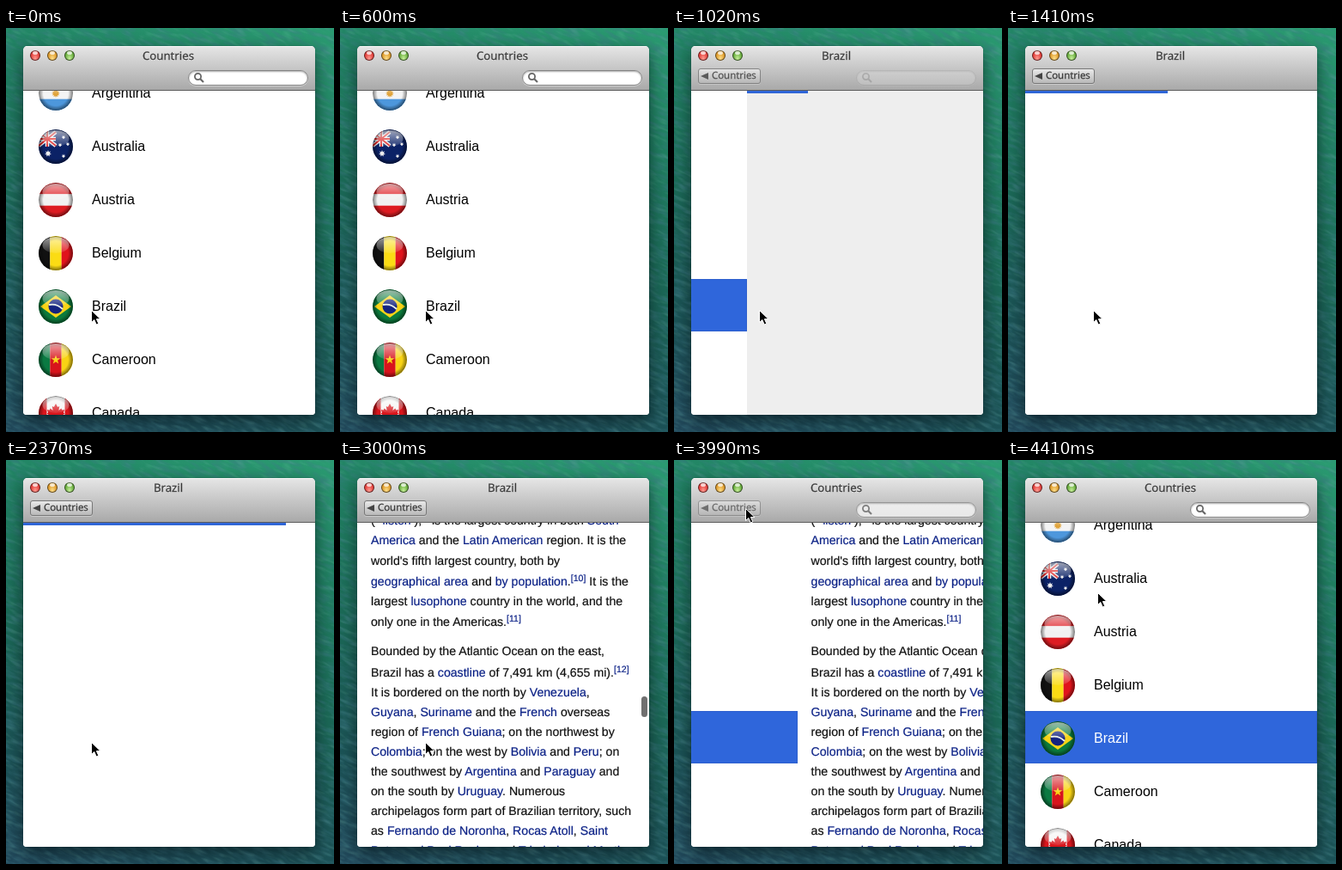
An HTML page for the animation above (4.44 s loop, 382 by 470 pixels).

```html
<!DOCTYPE html>
<html lang="en">
<head>
<meta charset="utf-8">
<title>Countries</title>
<style>
  html, body { margin: 0; width: 100%; height: 100%; overflow: hidden; }
  #stage {
    position: relative; width: 382px; height: 470px; overflow: hidden;
    background: linear-gradient(196deg, #2b9c72 0%, #218263 22%, #1b6a57 50%, #1b5456 76%, #21475a 100%);
  }
  #stage * { box-sizing: border-box; }
  #stage > *, #bar > *, .page, .row > *, .line, #thumb, #progress { position: absolute; }
  #stage *, #cursor * { animation: 4440ms linear infinite; }

  #sea { left: 0; top: 0; }
  #win {
    left: 20px; top: 21px; width: 340px; height: 429px; border-radius: 5px 5px 4px 4px;
    background: #fff; box-shadow: 0 7px 19px rgba(0, 10, 15, .6), 0 0 1px rgba(0, 0, 0, .5);
  }
  #clip { position: absolute; inset: 0; overflow: hidden; border-radius: inherit; }

  #bar {
    position: absolute; left: 0; top: 0; width: 340px; height: 52px;
    background: linear-gradient(#e6e6e6, #d0d0d0 35%, #a9a9a9);
    border-bottom: 1px solid #5c5c5c; box-shadow: inset 0 1px #f6f6f6;
    font-family: "Noto Sans", "Open Sans", sans-serif; color: #3a3a3a;
    -webkit-text-stroke: .25px; text-rendering: geometricPrecision;
  }
  .light { top: 5px; width: 12px; height: 12px; border-radius: 50%; border: 1px solid #0008; }
  .light::after {
    content: ""; position: absolute; left: 2px; top: 0; width: 6px; height: 4px;
    border-radius: 50%; background: #fffb;
  }
  .title { left: -1px; top: 2px; width: 340px; text-align: center; font-size: 13.2px; line-height: 18px; text-shadow: 0 1px #fff8; }
  #bar #tList { animation-name: listTitle; animation-timing-function: step-end; }
  #bar #tItem { animation-name: itemTitle; animation-timing-function: step-end; }
  #bar #back {
    left: 8px; top: 26px; width: 73px; height: 18px; border: 1px solid #777; border-radius: 3px;
    background: linear-gradient(#e9e9e9, #b9b9b9); box-shadow: 0 1px #fff5;
    font-size: 11.4px; line-height: 16px; padding-left: 15px; animation-name: backFade;
  }
  #back::before {
    content: ""; position: absolute; left: 2px; top: 4px;
    border: solid transparent; border-width: 4.5px 9px 4.5px 0; border-right-color: #444;
  }
  #bar #search {
    left: 192px; top: 28px; width: 140px; height: 18px; border: 1px solid #858585; border-radius: 9px;
    background: #fff; box-shadow: inset 0 1px 2px #0005, 0 1px #fff6; animation-name: searchFade;
  }
  #search svg { position: absolute; left: 5px; top: 1px; }

  #view { position: absolute; left: 0; top: 52px; width: 340px; height: 377px; overflow: hidden; }
  #view #track { position: absolute; left: 0; top: 0; width: 680px; height: 377px; animation-name: push; }
  .page { top: 0; width: 340px; height: 377px; overflow: hidden; }
  #list { left: 0; background: #fff; font: 16px "Liberation Sans", Arial, sans-serif; color: #000; }
  .row { position: absolute; left: 0; width: 340px; height: 61px; }
  .row svg { left: 18px; top: 12px; }
  .row span { left: 80px; top: 20px; line-height: 24px; }
  #list .picked { animation-name: pick; animation-timing-function: step-end; }
  #track #item { left: 340px; background: #eee; animation-name: paper; animation-timing-function: step-end; }
  #item #progress { left: 0; top: 0; height: 3px; background: #2f66d8; animation-name: load, loadFade; }
  #item #loaded { animation-name: show; animation-timing-function: step-end; }
  #loaded #article { position: absolute; left: 0; width: 340px; animation-name: scroll; }
  #article {
    font: 14.15px "Liberation Sans", Arial, sans-serif; color: #111;
    -webkit-text-stroke: .2px; text-rendering: geometricPrecision;
  }
  .line { left: 16px; height: 24px; line-height: 24px; white-space: pre; }
  .line b { font-weight: normal; color: #0b2186; }
  .line sup { font-size: 10.6px; line-height: 0; vertical-align: baseline; position: relative; top: -5px; color: #0b2186; }
  #article .head { font-size: 24px; }
  #loaded #thumb { left: 331px; width: 7px; height: 24px; border-radius: 4px; background: #707070; animation-name: thumb; }

  #stage #cursor { left: 0; top: 0; animation-name: point; }
  #cursor svg { position: absolute; overflow: visible; animation-timing-function: step-end; }
  #cursor #arrow { left: 0; top: 0; animation-name: arrow; }
  #cursor #beam { left: -2px; top: -9px; animation-name: beam; }

  @keyframes push {
    0%, 17.34% { left: 0; animation-timing-function: ease-in-out; }
    25.45%, 86.49% { left: -340px; animation-timing-function: ease-in-out; }
    94.59%, 100% { left: 0; }
  }
  @keyframes backFade {
    0%, 17.34% { opacity: 0; animation-timing-function: ease-in-out; }
    25.45%, 86.49% { opacity: 1; animation-timing-function: ease-in-out; }
    94.59%, 100% { opacity: 0; }
  }
  @keyframes searchFade {
    0%, 17.34% { opacity: 1; animation-timing-function: ease-in-out; }
    25.45%, 86.49% { opacity: 0; animation-timing-function: ease; }
    94.59%, 100% { opacity: 1; }
  }
  @keyframes listTitle { 0%, 86.49%, 100% { opacity: 1; } 17.34% { opacity: 0; } }
  @keyframes itemTitle { 0%, 86.49%, 100% { opacity: 0; } 17.34% { opacity: 1; } }
  @keyframes pick {
    0% { background: #fff; color: #000; box-shadow: none; }
    16.22%, 100% { background: #2f66db; color: #fff; box-shadow: inset 0 0 0 1px #2d5fcd; }
  }
  @keyframes paper { 0% { background: #eee; } 25.68%, 100% { background: #fff; } }
  @keyframes load {
    0%, 19.6% { width: 34px; }
    31.76% { width: 166px; }
    53.38% { width: 306px; }
    60.8%, 100% { width: 340px; }
  }
  @keyframes loadFade {
    0%, 17.34% { opacity: .3; }
    19.6% { opacity: .52; }
    22.5%, 60.8% { opacity: 1; }
    62.2%, 100% { opacity: 0; }
  }
  @keyframes show { 0% { visibility: hidden; } 61.49%, 100% { visibility: visible; } }
  @keyframes scroll {
    0%, 62.16% { top: 140px; animation-timing-function: ease-out; }
    67.57%, 100% { top: 0; }
  }
  @keyframes thumb {
    0%, 62.16% { top: 3px; animation-timing-function: ease-out; }
    67.57%, 100% { top: 202px; }
  }
  @keyframes point {
    0%, 76.35% { left: 99px; top: 328px; animation-timing-function: ease-in-out; }
    83.1%, 94.59% { left: 83px; top: 56px; animation-timing-function: ease-in-out; }
    99.1%, 100% { left: 104px; top: 154px; }
  }
  @keyframes arrow { 0%, 85.8%, 100% { visibility: visible; } 76.35% { visibility: hidden; } }
  @keyframes beam { 0%, 85.8%, 100% { visibility: hidden; } 76.35% { visibility: visible; } }
</style>
</head>
<body>
<div id="stage">
  <svg id="sea" width="382" height="470">
    <defs>
      <filter id="dark" x="0" y="0" width="100%" height="100%">
        <feTurbulence type="fractalNoise" baseFrequency=".05 .2" numOctaves="3" seed="4"/>
        <feColorMatrix values="0 0 0 0 .05  0 0 0 0 .2  0 0 0 0 .25  2.4 0 0 0 -1"/>
      </filter>
      <filter id="pale" x="0" y="0" width="100%" height="100%">
        <feTurbulence type="fractalNoise" baseFrequency=".06 .24" numOctaves="2" seed="9"/>
        <feColorMatrix values="0 0 0 0 .25  0 0 0 0 .62  0 0 0 0 .5  0 2.4 0 0 -1.2"/>
      </filter>
    </defs>
    <g transform="rotate(24 191 235)">
      <rect x="-160" y="-120" width="700" height="710" filter="url(#dark)" opacity=".5"/>
      <rect x="-160" y="-120" width="700" height="710" filter="url(#pale)" opacity=".22"/>
    </g>
  </svg>

  <div id="win"><div id="clip">
    <div id="view"><div id="track">
      <div id="list" class="page"></div>
      <div id="item" class="page">
        <div id="loaded"><div id="article"></div><div id="thumb"></div></div>
        <div id="progress"></div>
      </div>
    </div></div>
    <div id="bar">
      <i class="light" style="left:8px;background:radial-gradient(at 50% 90%,#ff9c92,#e2403c 70%)"></i>
      <i class="light" style="left:28px;background:radial-gradient(at 50% 90%,#ffe08a,#dd9a2c 70%)"></i>
      <i class="light" style="left:48px;background:radial-gradient(at 50% 90%,#c8f09a,#69ad3f 70%)"></i>
      <div id="tList" class="title">Countries</div>
      <div id="tItem" class="title">Brazil</div>
      <div id="back">Countries</div>
      <div id="search"><svg width="14" height="14" fill="none" stroke="#666" stroke-width="1.8">
        <circle cx="5.5" cy="5.5" r="3.6"/><path d="M8 8l4 4" stroke-width="2.2"/></svg></div>
    </div>
  </div></div>

  <div id="cursor">
    <svg id="arrow" width="13" height="19"><path d="M.5 .5V14.6L3.8 11.5L6.2 17L8.8 15.9L6.4 10.6H11Z" fill="#000" stroke="#fff"/></svg>
    <svg id="beam" width="7" height="17" fill="none">
      <path d="M.5 1Q3.5 1 3.5 3.5Q3.5 1 6.5 1M3.5 3V14M.5 16Q3.5 16 3.5 13.5Q3.5 16 6.5 16M2 10H5" stroke="#000" stroke-width="1.2"/>
    </svg>
  </div>
</div>

<script>
const $ = id => document.getElementById(id);
const rect = (x, y, w, h, fill) => `<rect x="${x}" y="${y}" width="${w}" height="${h}" fill="${fill}"/>`;
const across = colors => colors.map((c, i) => rect(0, i * 40 / 3, 40, 13.4, c)).join('');
const down = colors => colors.map((c, i) => rect(i * 40 / 3, 0, 13.4, 40, c)).join('');

function star(cx, cy, r, fill, points = 5, inner = .4) {
  const pts = [];
  for (let i = 0; i < points * 2; i++) {
    const a = Math.PI * (i / points - .5), d = i % 2 ? r * inner : r;
    pts.push((cx + d * Math.cos(a)).toFixed(1) + ',' + (cy + d * Math.sin(a)).toFixed(1));
  }
  return `<polygon points="${pts.join(' ')}" fill="${fill}"/>`;
}

const jack = '<path d="M0 3L20 19M20 3L0 19M10 2V20M0 11H20" stroke="#eee" stroke-width="4.5"/>' +
  '<path d="M0 3L20 19M20 3L0 19M10 2V20M0 11H20" stroke="#d22" stroke-width="1.8"/>';
const leaf = '<path d="M20 9l2.2 4 2-.9-.8 5 3-2.6.8 1.9 3-.4-1.3 3.4 1.5 1.1-5.4 4.2.5 2-5-.6v4h-1v-4l-5 .6.5-2-5.4-4.2 1.5-1.1-1.3-3.4 3 .4.8-1.9 3 2.6-.8-5 2 .9z" fill="#d8151c"/>';

const countries = {
  Argentina: across(['#5ba6e0', '#f4f4f4', '#4d97dc']) + star(20, 20, 5, '#e0a33a', 12, .6),
  Australia: rect(0, 0, 40, 40, '#0b2266') + jack + star(11, 28, 4, '#eee', 7, .5) +
    [[29, 9], [34, 17], [25, 18], [29, 31]].map(([x, y]) => star(x, y, 2.4, '#eee', 7, .5)).join(''),
  Austria: across(['#dd1c22', '#f1f1f1', '#dd1c22']),
  Belgium: down(['#111', '#fbdc14', '#e0141c']),
  Brazil: rect(0, 0, 40, 40, '#0b7a3c') + '<path d="M2 20L20 7L38 20L20 33Z" fill="#f7d417"/>' +
    '<circle cx="20" cy="20" r="8.5" fill="#14237f"/><path d="M12 18Q21 16 28 23" stroke="#e8eee8" stroke-width="1.8" fill="none"/>',
  Cameroon: down(['#0a7a42', '#d8141c', '#f8d314']) + star(20, 20, 5.5, '#f8d314'),
  Canada: rect(0, 0, 40, 40, '#f4f4f4') + rect(0, 0, 9.5, 40, '#d8151c') + rect(30.5, 0, 9.5, 40, '#d8151c') + leaf
};

const gloss = `<defs>
  <clipPath id="disc"><circle cx="20" cy="20" r="20"/></clipPath>
  <radialGradient id="rim"><stop offset=".72" stop-opacity="0"/><stop offset="1" stop-opacity=".5"/></radialGradient>
  <linearGradient id="shine" x2="0" y2="1"><stop stop-color="#fff" stop-opacity=".6"/><stop offset="1" stop-color="#fff" stop-opacity=".1"/></linearGradient>
  </defs>`;
const badge = (art, defs) => `<svg width="40" height="40">${defs}<g clip-path="url(#disc)">${art}
  <circle cx="20" cy="20" r="20" fill="url(#rim)"/><ellipse cx="20" cy="10.5" rx="15.5" ry="9.5" fill="url(#shine)"/></g></svg>`;

$('list').innerHTML = Object.entries(countries).map(([name, art], i) =>
  `<div class="row${name === 'Brazil' ? ' picked' : ''}" style="top:${i * 62 - 29}px">` +
  `${badge(art, i ? '' : gloss)}<span>${name}</span></div>`).join('');

// [text] marks a link, ^n^ a footnote; the number is the line's vertical centre.
const lines = [
  [24, 'Brazil, officially the [Federative Republic] of'],
  [47, 'Brazil, in [Portuguese] the same name'],
  [70, '(• [listen] ),\u00a0\u00a0 is the largest country in both [South]'],
  [93, '[America] and the [Latin American] region. It is the'],
  [117, "world's fifth largest country, both by"],
  [141, '[geographical area] and [by population].^10^ It is the'],
  [164, 'largest [lusophone] country in the world, and the'],
  [188, 'only one in the Americas.^11^'],
  [222, 'Bounded by the Atlantic Ocean on the east,'],
  [247, 'Brazil has a [coastline] of 7,491 km (4,655 mi).^12^'],
  [270, 'It is bordered on the north by [Venezuela],'],
  [293, '[Guyana], [Suriname] and the [French] overseas'],
  [316, 'region of [French Guiana]; on the northwest by'],
  [339, '[Colombia]; on the west by [Bolivia] and [Peru]; on'],
  [362, 'the southwest by [Argentina] and [Paraguay] and'],
  [385, 'on the south by [Uruguay]. Numerous'],
  [408, 'archipelagos form part of Brazilian territory, such'],
  [431, 'as [Fernando de Noronha], [Rocas Atoll], [Saint]'],
  [454, '[Peter and Paul Rocks], and [Trindade and Martim]'],
  [477, '[Vaz].']
];
const markup = s => s.replace(/\[(.+?)\]/g, '<b>$1</b>').replace(/\^(\d+)\^/g, '<sup>[$1]</sup>');
$('article').innerHTML = '<div class="line head" style="top:-122px">Brazil</div>' + lines.map(([y, text]) =>
  `<div class="line" style="top:${y - 85}px">${markup(text)}</div>`).join('');
</script>
</body>
</html>
```
